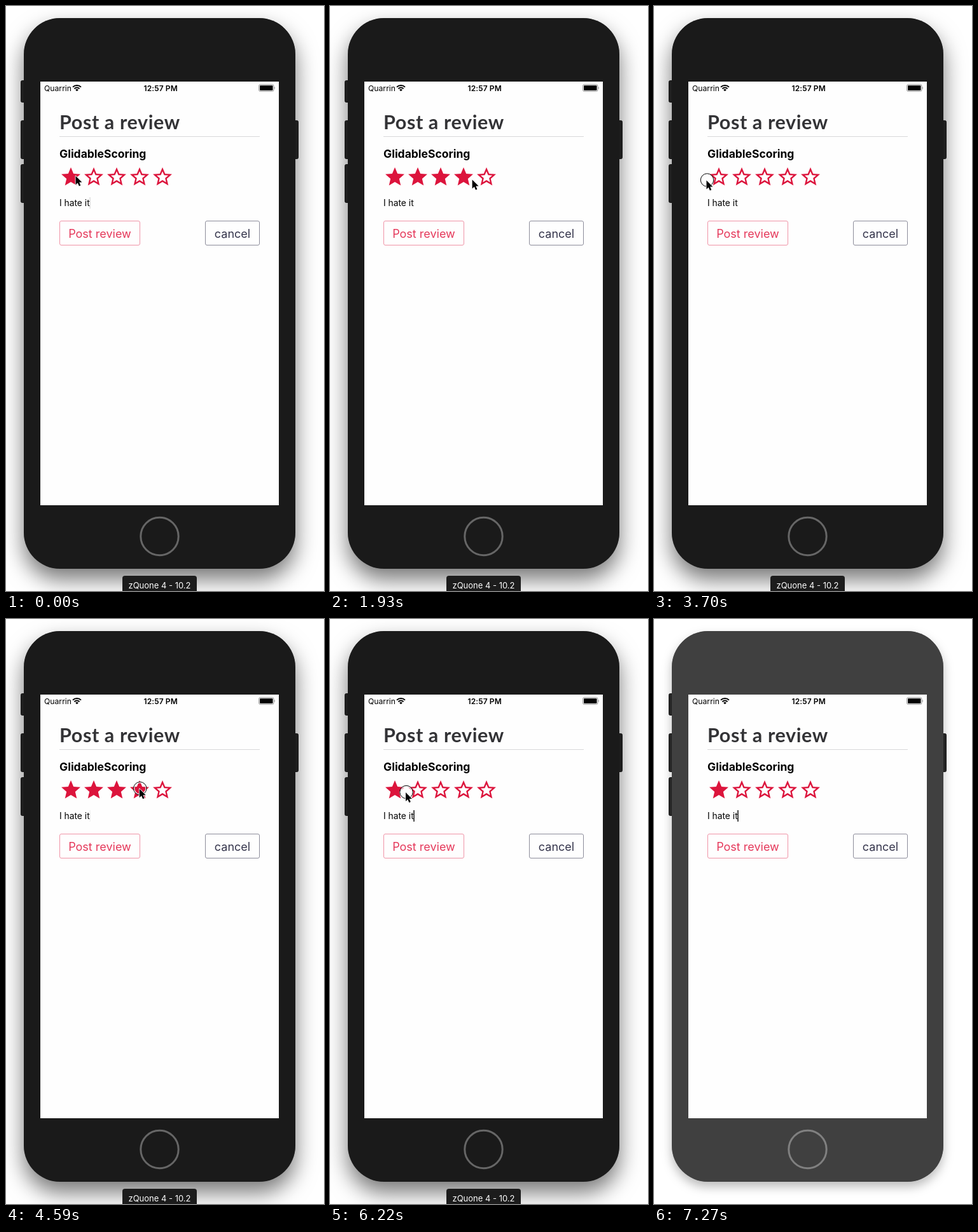
An HTML page that plays this animation: 500 by 921 pixels, repeating every 7.37 s.

```html
<!DOCTYPE html>
<html lang="en">
<head>
<meta charset="utf-8">
<title>Swipe rating</title>
<style>
  html, body { margin: 0; height: 100%; overflow: hidden; background: #fff; }
  svg { display: block; font-family: Inter, Roboto, sans-serif; }
  #body { fill: #1a1a1a; filter: drop-shadow(0 0 .6px #777) drop-shadow(0 17px 17px #0008); }
  #home { fill: none; stroke: #666; stroke-width: 3; }
  .idle #body { fill: #404040; filter: drop-shadow(0 0 .6px #777) drop-shadow(0 8px 8px #0004); }
  .idle #home { stroke: #808080; }
  .idle #label { display: none; }
  .keys { fill: #292929; stroke: #1a1a1a; }
  .title { font: bold 30.5px Lato, sans-serif; letter-spacing: .6px; fill: #333336; }
  .button { font-size: 18px; text-anchor: middle; }
</style>
</head>
<body>
<svg id="stage" width="500" height="921" viewBox="0 0 500 921">
  <g class="keys">
    <rect x="23.5" y="117.5" width="8" height="34" rx="2"/>
    <rect x="23.5" y="180.5" width="8" height="60" rx="2"/>
    <rect x="23.5" y="249.5" width="8" height="60" rx="2"/>
    <rect x="451.5" y="180.5" width="8" height="60" rx="2"/>
  </g>
  <rect id="body" x="28" y="19" width="427" height="867" rx="57"/>
  <circle id="home" cx="241.5" cy="835" r="29.7"/>
  <rect x="54" y="119" width="375" height="667" fill="#fefefe"/>

  <text x="60" y="133.500" font-size="12.200">Quarrin</text>
  <g fill="none" stroke="#000" stroke-width="2">
    <path d="M105 127.600a9.300 9.300 0 0 1 13 0M107.500 130.200a5.700 5.700 0 0 1 8 0"/>
  </g>
  <path d="M111.500 134.300l-2.300-2.400a3.300 3.300 0 0 1 4.600 0z"/>
  <text x="243.200" y="133.500" font-size="12" font-weight="600" text-anchor="middle" letter-spacing=".1">12:57 PM</text>
  <rect x="397.500" y="123.500" width="23.500" height="11" rx="2.500" fill="none" stroke="#999"/>
  <rect x="399" y="125" width="20.500" height="8" rx="1"/>
  <path d="M422 127q2 2 0 4z" fill="#999"/>

  <text class="title" x="84" y="194">Post a review</text>
  <path d="M84 205.500H399" stroke="#d8d8da"/>
  <text x="84" y="238.500" font-size="17.500" font-weight="700">GlidableScoring</text>
  <g id="stars" fill="#dc143c"></g>
  <text x="84" y="315" font-size="13.800">I hate it</text>
  <rect id="caret" x="131.300" y="301" width="1.400" height="18"/>
  <rect x="84.500" y="338.500" width="126" height="38" rx="2.500" fill="none" stroke="#f094a7"/>
  <text class="button" x="147.500" y="364.500" fill="#e5395b">Post review</text>
  <rect x="313.500" y="338.500" width="85" height="38" rx="2.500" fill="none" stroke="#8d8d9b"/>
  <text class="button" x="356" y="364.500" fill="#35354c">cancel</text>

  <g id="label">
    <path d="M183 921V901q0-4 4-4H296q4 0 4 4V921z" fill="#1c1c1c"/>
    <text x="241.500" y="917" font-size="13" fill="#fff" text-anchor="middle">zQuone 4 - 10.2</text>
  </g>

  <g id="cursor">
    <g id="touch" fill="none">
      <circle cx="1.500" r="9.300" stroke="#fff" stroke-width="1.500"/>
      <circle cx="1.500" r="10.200" stroke="#000"/>
    </g>
    <path d="M.5 .5V14.500L3.700 11.500L5.900 16.500L8.300 15.500L6.200 10.500H10.500Z"
      stroke="#fff" stroke-width="1.600" paint-order="stroke" stroke-linejoin="round"/>
  </g>
</svg>
<script>
  const LOOP = 7370, STEP = 148.2, STAR_X = 84, STAR_SIZE = 36;
  const FULL = 'M12 17.27L18.18 21l-1.64-7.03L22 9.24l-7.19-.61L12 2 9.19 8.63 2 9.24l5.46 4.73L5.82 21z';
  const HOLLOW = FULL + 'M12 15.4l-3.76 2.27 1-4.28-3.32-2.88 4.38-.38L12 6.1l1.71 4.04 4.38.38-3.32 2.88 1 4.28z';

  // Pointer waypoints: step, x, y
  const route = [
    [0, 109, 267], [1, 108.5, 268], [2, 108.5, 268], [8, 197, 273], [10, 207, 273],
    [18, 250, 273], [19, 241, 273], [24, 80, 274], [25, 82, 274], [26, 93, 272],
    [30, 248, 266], [34, 93, 269], [36, 248, 270], [37, 199, 270], [38, 138, 272],
    [39, 138, 272], [45, 99, 273], [50, 99, 273]
  ];

  const $ = id => document.getElementById(id);
  const clamp = v => Math.max(0, Math.min(1, v));
  const show = (el, on) => el.setAttribute('visibility', on ? 'visible' : 'hidden');

  const stars = Array.from({ length: 5 }, (_, i) => {
    const star = document.createElementNS('http://www.w3.org/2000/svg', 'path');
    star.setAttribute('transform', `translate(${STAR_X + i * STAR_SIZE} 251) scale(1.5)`);
    star.setAttribute('fill-rule', 'evenodd');
    return $('stars').appendChild(star);
  });

  function pointerAt(step) {
    const i = route.findIndex(p => p[0] > step);
    const [s0, x0, y0] = route[i - 1], [s1, x1, y1] = route[i];
    const k = (step - s0) / (s1 - s0);
    return [x0 + (x1 - x0) * k, y0 + (y1 - y0) * k];
  }

  // The caret blinks once a second with short fades
  function caretAlpha(step) {
    const phase = (step * STEP / 1000 + .02) % 1;
    return phase < .4 ? clamp(phase * 7) : clamp((.62 - phase) * 10);
  }

  function draw(now) {
    const step = Math.min(49, Math.floor((now % LOOP + 9) / STEP));
    const [x, y] = pointerAt(step);
    const rating = Math.ceil((x - STAR_X) / STAR_SIZE);
    stars.forEach((star, i) => star.setAttribute('d', i < rating ? FULL : HOLLOW));
    $('caret').setAttribute('opacity', caretAlpha(step));
    $('cursor').setAttribute('transform', `translate(${x} ${y})`);
    show($('cursor'), step < 47);
    show($('touch'), step >= 20 && step < 47);
    $('touch').style.visibility = step >= 20 && step < 47 ? 'visible' : 'hidden';
    $('stage').classList.toggle('idle', step === 49);
  }

  const start = performance.now();
  (function tick() {
    draw(performance.now() - start);
    requestAnimationFrame(tick);
  })();
</script>
</body>
</html>
```
